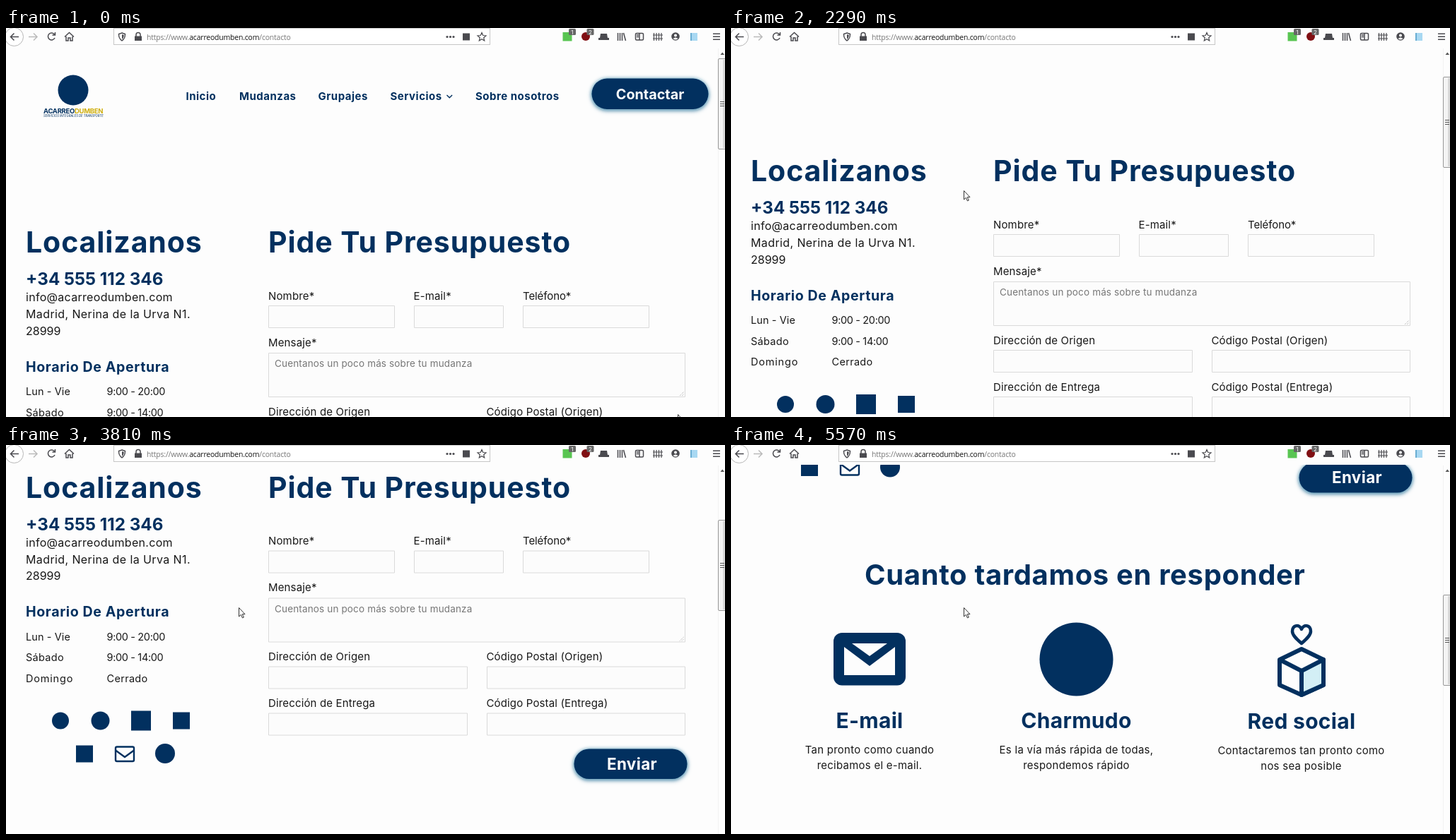
Animation, 1017 px wide and 551 px high, one loop 8 s. Source, as an HTML page:

```html
<!DOCTYPE html>
<html lang="es">
<head>
<meta charset="utf-8">
<title>Contacto</title>
<style>
html, body { margin: 0; width: 100%; height: 100%; overflow: hidden; background: #fdfdfd; }
svg { display: block; font-family: Inter, "Open Sans", sans-serif; }
text { white-space: pre; }
.navy { fill: #02305f; }
.bold { font-weight: 700; fill: #02305f; }
.h1 { font-size: 41px; letter-spacing: .9px; }
.h3 { font-size: 30px; letter-spacing: .3px; text-anchor: middle; }
.menu { font-size: 15px; letter-spacing: .5px; }
.body { font-size: 16px; fill: #181818; }
.hours { font-size: 14.5px; fill: #181818; }
.label { font-size: 15px; letter-spacing: .15px; fill: #181818; }
.note { font-size: 14.9px; letter-spacing: .3px; fill: #181818; text-anchor: middle; }
.field { fill: #fcfcfc; stroke: #dadada; }
.pill rect { fill: #02305f; filter: drop-shadow(0 0 2.5px #7fb6cc) drop-shadow(0 2px 2px #6c9ab5); }
.pill text { font-weight: 700; fill: #fff; text-anchor: middle; }
.line { fill: none; stroke: #4a4a4f; stroke-width: 1.5; }
.ink { fill: #4a4a4f; }
</style>
</head>
<body>
<svg width="1017" height="551" viewBox="0 0 1017 551">
  <rect width="1017" height="551" fill="#fdfdfd"/>

  <g id="page">
    <circle class="navy" cx="95" cy="88" r="21.5"/>
    <text class="bold" x="53" y="121" font-size="9.5" letter-spacing="-.3">ACARREO<tspan fill="#cfae0c">DUMBEN</tspan></text>
    <text class="navy" x="53" y="126" font-size="4.2" font-style="italic">SERVICIOS INTEGRALES DE TRANSPORTE</text>

    <g class="bold menu">
      <text x="254.500" y="101.500">Inicio</text>
      <text x="330" y="101.500">Mudanzas</text>
      <text x="441.500" y="101.500">Grupajes</text>
      <text x="543.500" y="101.500">Servicios</text>
      <text x="664" y="101.500">Sobre nosotros</text>
    </g>
    <path d="M623.500 95l3.800 3.800 3.800-3.800" fill="none" stroke="#02305f" stroke-width="1.400"/>
    <g class="pill">
      <rect x="828.500" y="71.500" width="165" height="43.500" rx="21.700"/>
      <text x="911" y="100.500" font-size="19.800">Contactar</text>
    </g>

    <text class="bold h1" x="28" y="318">Localizanos</text>
    <text class="bold" x="28" y="364" font-size="24.200">+34 555 112 346</text>
    <g class="body">
      <text x="28" y="387" letter-spacing=".3">info@acarreodumben.com</text>
      <text x="28" y="411" letter-spacing=".4">Madrid, Nerina de la Urva N1.</text>
      <text x="28" y="434.500">28999</text>
    </g>
    <text class="bold" x="28" y="486.500" font-size="19.600" letter-spacing=".6">Horario De Apertura</text>
    <g class="hours">
      <text x="28" y="520" letter-spacing=".1">Lun - Vie</text>
      <text x="142.500" y="520" letter-spacing="-.35">9:00 - 20:00</text>
      <text x="28" y="549.500" letter-spacing=".3">Sábado</text>
      <text x="142.500" y="549.500" letter-spacing="-.35">9:00 - 14:00</text>
      <text x="28" y="579" letter-spacing=".8">Domingo</text>
      <text x="142.500" y="579" letter-spacing=".3">Cerrado</text>
    </g>

    <g class="navy">
      <circle cx="77" cy="634" r="12"/>
      <circle cx="133.500" cy="634" r="13"/>
      <rect x="177" y="620" width="28" height="28"/>
      <rect x="236" y="622" width="24" height="24"/>
      <rect x="99" y="669" width="24" height="24"/>
      <circle cx="225" cy="680.500" r="14"/>
    </g>
    <g fill="none" stroke="#02305f" stroke-width="2.400">
      <rect x="155" y="671" width="26" height="20.500" rx="2"/>
      <path d="M155 676l13 9.500 13-9.500"/>
    </g>

    <text class="bold h1" x="371" y="318">Pide Tu Presupuesto</text>
    <g class="label">
      <text x="371" y="384.500">Nombre*</text>
      <text x="576.500" y="384.500">E-mail*</text>
      <text x="731" y="384.500" letter-spacing="-.1">Teléfono*</text>
      <text x="371" y="450.500">Mensaje*</text>
      <text x="371" y="548.500">Dirección de Origen</text>
      <text x="679.500" y="548.500">Código Postal (Origen)</text>
      <text x="371" y="614.500">Dirección de Entrega</text>
      <text x="679.500" y="614.500">Código Postal (Entrega)</text>
    </g>
    <g class="field">
      <path d="M371.500 393.500h178v31h-178zM577.500 393.500h126v31h-126zM731.500 393.500h178v31h-178z"/>
      <path d="M371.500 460.500h589v62h-589z"/>
      <path d="M371.500 557.500h281v31h-281zM680.500 557.500h280v31h-280z"/>
      <path d="M371.500 623.500h281v31h-281zM680.500 623.500h280v31h-280z"/>
    </g>
    <path d="M953 521l6-6M956 521l3-3" stroke="#aaa" stroke-dasharray="1 1"/>
    <text x="380" y="480" font-size="13.500" letter-spacing=".15" fill="#777">Cuentanos un poco más sobre tu mudanza</text>
    <g class="pill">
      <rect x="803.500" y="674" width="160" height="42.500" rx="21.200"/>
      <text x="885.500" y="703" font-size="22.400" letter-spacing=".4">Enviar</text>
    </g>

    <g class="bold">
      <text x="189" y="846.500" font-size="40" letter-spacing=".65">Cuanto tardamos en responder</text>
      <text class="h3" x="196" y="1049.500">E-mail</text>
      <text class="h3" x="488.500" y="1049.500">Charmudo</text>
      <text class="h3" x="807" y="1050.500">Red social</text>
    </g>
    <g class="note">
      <text x="196" y="1086">Tan pronto como cuando</text>
      <text x="196" y="1107.500">recibamos el e-mail.</text>
      <text x="488.500" y="1086">Es la vía más rápida de todas,</text>
      <text x="488.500" y="1107.500">respondemos rápido</text>
      <text x="806.500" y="1087">Contactaremos tan pronto como</text>
      <text x="806.500" y="1108.500">nos sea posible</text>
    </g>
    <rect class="navy" x="145" y="915" width="102" height="74.500" rx="12"/>
    <path d="M171 930h50l-25 18zM160 935l36 27 36-27v40h-72z" fill="#fdfdfd"/>
    <circle class="navy" cx="488.500" cy="952.500" r="52"/>
    <g stroke="#02305f" stroke-width="6" stroke-linejoin="round" fill="#fdfdfd">
      <path d="M807 930c-8-7-13-12-13-17 0-9 10-11 13-3 3-8 13-6 13 3 0 5-5 10-13 17z" stroke-width="4.500"/>
      <path d="M807 938l31 15v36l-31 14-31-14v-36z"/>
      <path d="M807 969l31-16v36l-31 14z" fill="#d3eff5"/>
      <path d="M776 953l31 16"/>
    </g>
  </g>

  <g id="scrollbar">
    <path d="M1007.500 29v522" stroke="#f2f2f2"/>
    <path d="M1010.500 38l2.800-3.500 2.800 3.500z" fill="#555"/>
    <g id="thumb">
      <rect x="1007.500" y="43.500" width="14" height="128" rx="1.500" fill="#f4f4f4" stroke="#979797"/>
      <path d="M1014 45h3v125h-3z" fill="#d9d9d9"/>
      <path d="M1010 104.500h6M1010 107.500h6M1010 110.500h6" stroke="#555"/>
    </g>
  </g>

  <g id="browser">
    <rect width="1017" height="28" fill="#fdfdfd"/>
    <circle cx="11.500" cy="12.500" r="13" fill="#fff" stroke="#b5b5b5"/>
    <g class="line">
      <path d="M18 12.500H6.500m5-5l-5 5 5 5"/>
      <path d="M32 12.500h12m-5-5l5 5-5 5" stroke="#bbb"/>
      <path d="M68.500 9a5 5 0 1 0 .5 5M69.500 6v4h-4"/>
      <path d="M83 12.500l6.500-6 6.500 6M85 12v6h3v-4h3v4h3v-6"/>
    </g>
    <rect x="152.500" y=".5" width="532" height="23" fill="#fff" stroke="#c6c6c6"/>
    <path class="line" d="M164 7l4.500 1.500c0 5-1 7-4.500 9.500-3.500-2.500-4.500-4.500-4.500-9.500zM184 12v-2.500a3 3 0 0 1 6 0V12"/>
    <path class="ink" d="M164 9v7c2-2 2.500-3 2.800-6zM182 11.500h10v6.500h-10z"/>
    <text x="199" y="17" font-family="Open Sans, sans-serif" font-size="10.400" letter-spacing="-.15" fill="#777">https://www.<tspan fill="#111">acarreodumben.com</tspan>/contacto</text>
    <g class="ink">
      <circle cx="624" cy="12.500" r="1.600"/><circle cx="628.500" cy="12.500" r="1.600"/><circle cx="633" cy="12.500" r="1.600"/>
      <rect x="646" y="7.500" width="10" height="10"/>
      <path d="M841 8h9l1 6h2v3h-15v-3h2z"/>
      <path d="M1000 7.500h10v1.500h-10zM1000 11.500h10v1.500h-10zM1000 15.500h10v1.500h-10z"/>
    </g>
    <g class="line">
      <path d="M673 6.500l1.700 4 4.300.4-3.300 2.800 1 4.300-3.700-2.300-3.700 2.300 1-4.300-3.300-2.800 4.300-.4z" stroke-width="1.200"/>
      <path d="M865.500 7v11M868.500 7v11M871.500 7v11M873.500 7l3 11"/>
      <rect x="890.500" y="7.500" width="11" height="9.500" rx="1.500"/>
      <path d="M896 7.500V17M892 10h3M892 12.500h3"/>
      <path d="M916.500 7v11M920 7v11M923.500 7v11M927 7v11M915 10h14M915 15h14" stroke-width="1.200"/>
    </g>
    <circle class="ink" cx="947" cy="12" r="5.800"/>
    <path d="M943.500 15q3.500-3 7 0-3.500 3-7 0zM945 10.500a2 2 0 1 1 4 0 2 2 0 1 1-4 0" fill="#fff"/>
    <rect x="787.500" y="6" width="13" height="12.500" fill="#59c552"/>
    <circle cx="820" cy="12" r="6" fill="#800f13"/>
    <rect x="968" y="7" width="10" height="11" fill="#a8d8f2"/>
    <path d="M968 7h2v11h-2z" fill="#69add2"/>
    <rect x="796" y="1" width="10" height="9" rx="1.500" fill="#666"/>
    <rect x="821.500" y="1" width="10" height="9" rx="1.500" fill="#666"/>
    <g fill="#fff" font-size="8" text-anchor="middle">
      <text x="801" y="8.500">1</text>
      <text x="826.500" y="8.500">2</text>
    </g>
  </g>

  <path id="cursor" d="M.5.5v12.500l2.900-2.700 2 4.600 1.900-.8-2-4.500h3.700z" fill="#fff" stroke="#333"/>
</svg>
<script>
const LOOP = 8000;
const [page, thumb, cursor] = ["page", "thumb", "cursor"].map(id => document.getElementById(id));

// [time in ms, scroll offset in px], held until the next entry
const scrolls = [
  [0, 0], [1680, 20], [1770, 24], [1940, 60], [2030, 81],
  [2290, 101], [2380, 125], [2480, 146], [2590, 158], [2690, 162],
  [3430, 164], [3540, 190], [3630, 217], [3720, 237], [3810, 243.5],
  [5030, 247], [5160, 275], [5260, 315], [5360, 377], [5460, 520], [5570, 649]
];

const move = (el, x, y) => el.setAttribute("transform", `translate(${x} ${y})`);

function pointer(t) {
  if (t >= 730) return [329, 230];
  const step = t < 70 ? 0 : Math.min(8, Math.floor((t - 70) / 74.28) + 1);
  const k = step / 8, p = k * k * (3 - 2 * k);
  return [950 - 630 * p, 547 - 327 * p ** 0.6];
}

const start = performance.now();

function draw() {
  const t = (performance.now() - start) % LOOP;
  const y = scrolls.findLast(s => s[0] <= t)[1];
  move(page, 0, -y);
  move(thumb, 0, Math.round(y * 0.26));
  move(cursor, ...pointer(t));
  requestAnimationFrame(draw);
}
draw();
</script>
</body>
</html>
```
